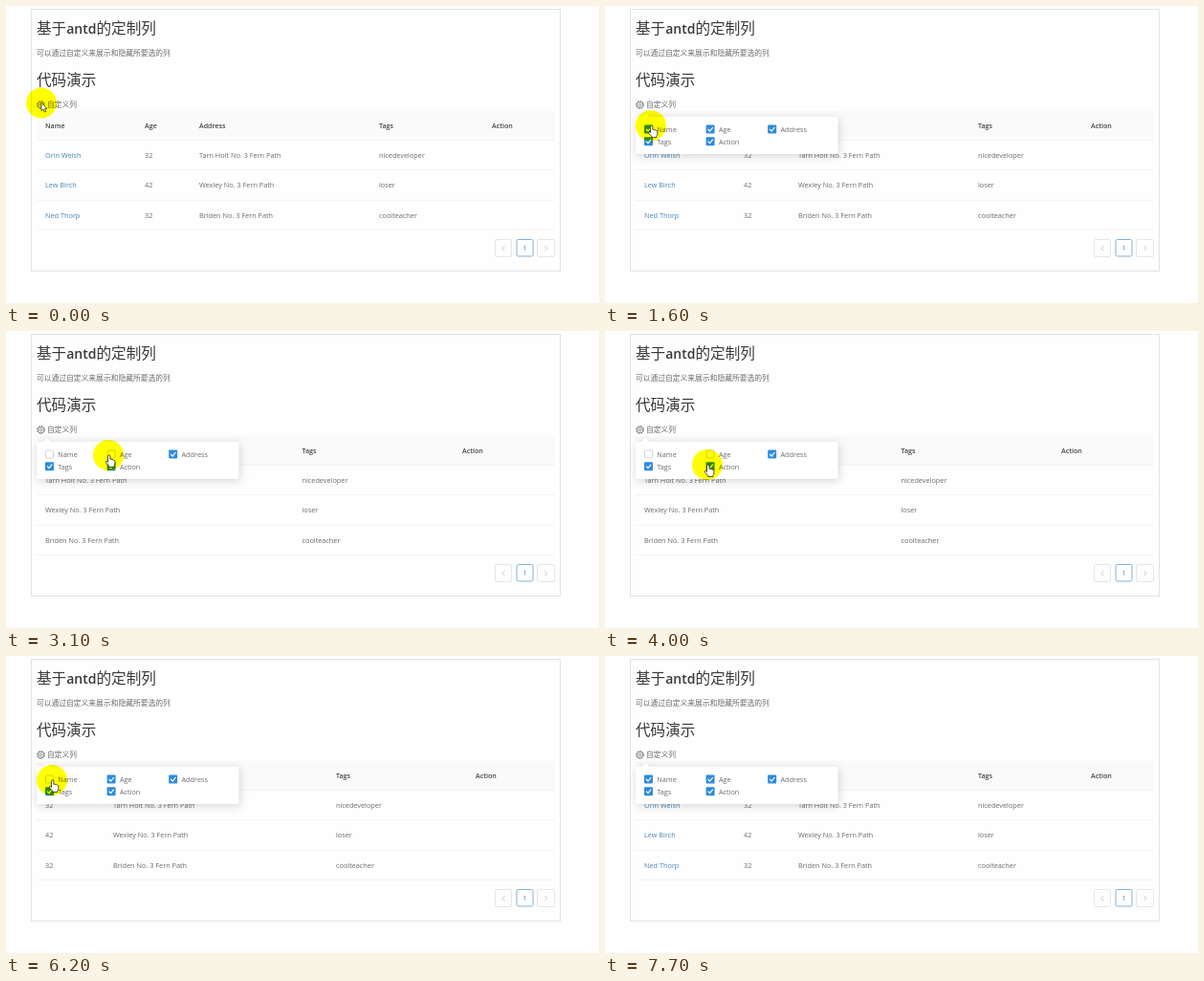
Recreate the animation shown at these times as an HTML page. Size 620 by 311 pixels, loop 8000 ms.

```html
<!DOCTYPE html>
<html lang="zh-CN">
<head>
<meta charset="utf-8">
<title>定制列</title>
<style>
  html, body { margin: 0; width: 100%; height: 100%; overflow: hidden; background: #fefefe; }
  svg { display: block; width: 620px; height: 311px; }
  text { font: 7.3px "Open Sans", "Noto Sans CJK SC", "Noto Sans CJK", sans-serif; fill: #6a6a6a; }
  .title { font-size: 15.6px; fill: #383838; }
  .latin { font-size: 14px; font-weight: 600; }
  .cn { font-size: 7.77px; }
  .head { font-size: 7.1px; font-weight: 600; fill: #444; }
  .link { fill: #4583b8; }
  .line { stroke: #f3f3f3; }
  .halo { fill: #ff0; mix-blend-mode: multiply; }
  #panel { filter: drop-shadow(1px 2px 5px rgba(0, 0, 0, .16)); }
</style>
</head>
<body>
<svg viewBox="0 0 620 311">
  <rect width="620" height="311" fill="#fefefe"/>
  <rect x="26.5" y="3.5" width="553" height="274" fill="#fefefe" stroke="#e3e3e3"/>
  <text class="title" x="32" y="29">基于<tspan class="latin">antd</tspan>的定制列</text>
  <text class="cn" x="32" y="52">可以通过自定义来展示和隐藏所要选的列</text>
  <text class="title" x="32" y="83">代码演示</text>
  <g fill="none" stroke="#666">
    <circle cx="36.5" cy="103.5" r="3.4" stroke-width=".8"/>
    <circle cx="36.5" cy="103.5" r="3.9" stroke-width=".8" stroke-dasharray="1.5 1.56"/>
    <circle cx="36.5" cy="103.5" r="1.4" stroke-width=".8"/>
  </g>
  <text class="cn" x="43" y="106">自定义列</text>
  <rect x="32" y="110" width="542" height="30.5" fill="#fafafa"/>
  <path class="line" d="M32 140.5H574M32 171.5H574M32 203.5H574M32 234.5H574"/>
  <g id="table"></g>
  <g fill="#fefefe" stroke="#e6e6e6">
    <rect x="511.5" y="244.5" width="17" height="18" rx="1.5"/>
    <rect x="555.5" y="244.5" width="18" height="18" rx="1.5"/>
    <rect x="534" y="244.5" width="17" height="17.5" rx="1.5" stroke="#83b1d6"/>
    <path d="M521.5 251l-2.6 2.7 2.6 2.7M563.3 251l2.6 2.7-2.6 2.7" fill="none" stroke="#c4c4c4" stroke-width=".9"/>
  </g>
  <text class="link" x="542.5" y="256.3" text-anchor="middle">1</text>
  <g id="panel">
    <path d="M34 116h4.500l4-4 4 4H241.500q2 0 2 2V153q0 2-2 2H34q-2 0-2-2V118q0-2 2-2z" fill="#fff"/>
    <g id="boxes"></g>
  </g>
  <g id="pointer">
    <circle class="halo" r="16"/>
    <path id="arrow" transform="scale(.9)" d="M0 0V9.200L2.200 7.200 3.700 10.600 5.300 9.900 3.800 6.600H6.700z" fill="#fff" stroke="#222" stroke-width=".8"/>
    <path id="hand" d="M-.5 7.500V1.200Q-.5 0 .7 0T1.900 1.200V4.300Q3.100 3.700 3.700 4.700 5 4.200 5.400 5.200 6.900 4.900 6.900 6.500V9Q6.800 10.300 5.900 11.300V12.500H.7V11.300L-2.600 7.700Q-3 6.400-1.700 6.300z" fill="#fff" stroke="#222" stroke-width=".8"/>
  </g>
</svg>
<script>
const LOOP = 8000, STEP = 100;
const $ = id => document.getElementById(id);

const columns = ["Name", "Age", "Address", "Tags", "Action"];
const rows = [
  ["Orin Welsh", "32", "Tarn Holt No. 3 Fern Path", "nicedeveloper", ""],
  ["Lew Birch", "42", "Wexley No. 3 Fern Path", "loser", ""],
  ["Ned Thorp", "32", "Briden No. 3 Fern Path", "coolteacher", ""]
];
// Column starts, by the number of visible columns
const layouts = {
  5: [41, 145, 202, 390, 508],
  4: [41, 112, 345, 491],
  3: [41, 309.5, 477]
};
const hiddenSpans = { Name: [1900, 6400], Age: [2900, 5600] };
const path = [
  [0, 37, 101.5], [1300, 37, 101.5], [1700, 50, 129.5], [2300, 50, 129.5],
  [2700, 107, 130], [3300, 107, 130], [3600, 107, 140], [4900, 107, 140],
  [5200, 107.5, 136], [5300, 107.5, 136], [5500, 107.5, 130], [5800, 107.5, 130],
  [6150, 48, 130], [6450, 48, 130], [6700, 215, 258], [6900, 337, 340]
];

const label = (x, y, str, cls = "") => `<text class="${cls}" x="${x}" y="${y}">${str}</text>`;
const clamp = v => Math.max(0, Math.min(1, v));
const ease = v => v * v * (3 - 2 * v);

function isShown(name, t) {
  const span = hiddenSpans[name];
  return !span || t < span[0] || t >= span[1];
}

function tableMarkup(shown) {
  const visible = columns.map((_, i) => i).filter(i => shown[i]);
  return visible.map((col, i) => {
    const x = layouts[visible.length][i];
    const cells = rows.map((row, r) => label(x, 159 + r * 31.4, row[col], col ? "" : "link"));
    return label(x, 127.7, columns[col], "head") + cells.join("");
  }).join("");
}

function boxMarkup(name, i, on) {
  const x = 41 + (i % 3) * 64.6, y = i < 3 ? 124.5 : 137.2;
  const box = on
    ? `<rect x="${x}" y="${y}" width="9" height="9" rx="1" fill="#2f8bdc"/>
       <path d="M${x + 2} ${y + 4.5}l2 2 3.200-4" fill="none" stroke="#fff" stroke-width="1.200"/>`
    : `<rect x="${x + .5}" y="${y + .5}" width="8" height="8" rx="1" fill="#fff" stroke="#d5d5d5"/>`;
  return box + label(x + 13.3, y + 7.300, name);
}

function pointerAt(t) {
  const n = path.findIndex(p => p[0] > t);
  if (n < 0) return path[path.length - 1].slice(1);
  const [a, b] = [path[n - 1], path[n]];
  const k = ease((t - a[0]) / (b[0] - a[0]));
  return [a[1] + (b[1] - a[1]) * k, a[2] + (b[2] - a[2]) * k];
}

let lastState = "";
function draw(t) {
  const shown = columns.map(name => isShown(name, t));
  if (shown.join() !== lastState) {
    lastState = shown.join();
    $("table").innerHTML = tableMarkup(shown);
    $("boxes").innerHTML = columns.map((name, i) => boxMarkup(name, i, shown[i])).join("");
  }
  const open = clamp((t - 500) / 200);
  $("panel").setAttribute("opacity", open);
  $("panel").setAttribute("transform", `translate(42 112) scale(${.8 + .2 * ease(open)}) translate(-42 -112)`);

  const [x, y] = pointerAt(t);
  const overPanel = y > 120 && y < 152;
  $("pointer").setAttribute("transform", `translate(${x} ${y})`);
  $("hand").setAttribute("visibility", overPanel ? "visible" : "hidden");
  $("arrow").setAttribute("visibility", overPanel ? "hidden" : "visible");
}

const start = performance.now();
function tick() {
  const t = (performance.now() - start) % LOOP;
  draw(Math.floor(t / STEP) * STEP);
  requestAnimationFrame(tick);
}
tick();
</script>
</body>
</html>
```
